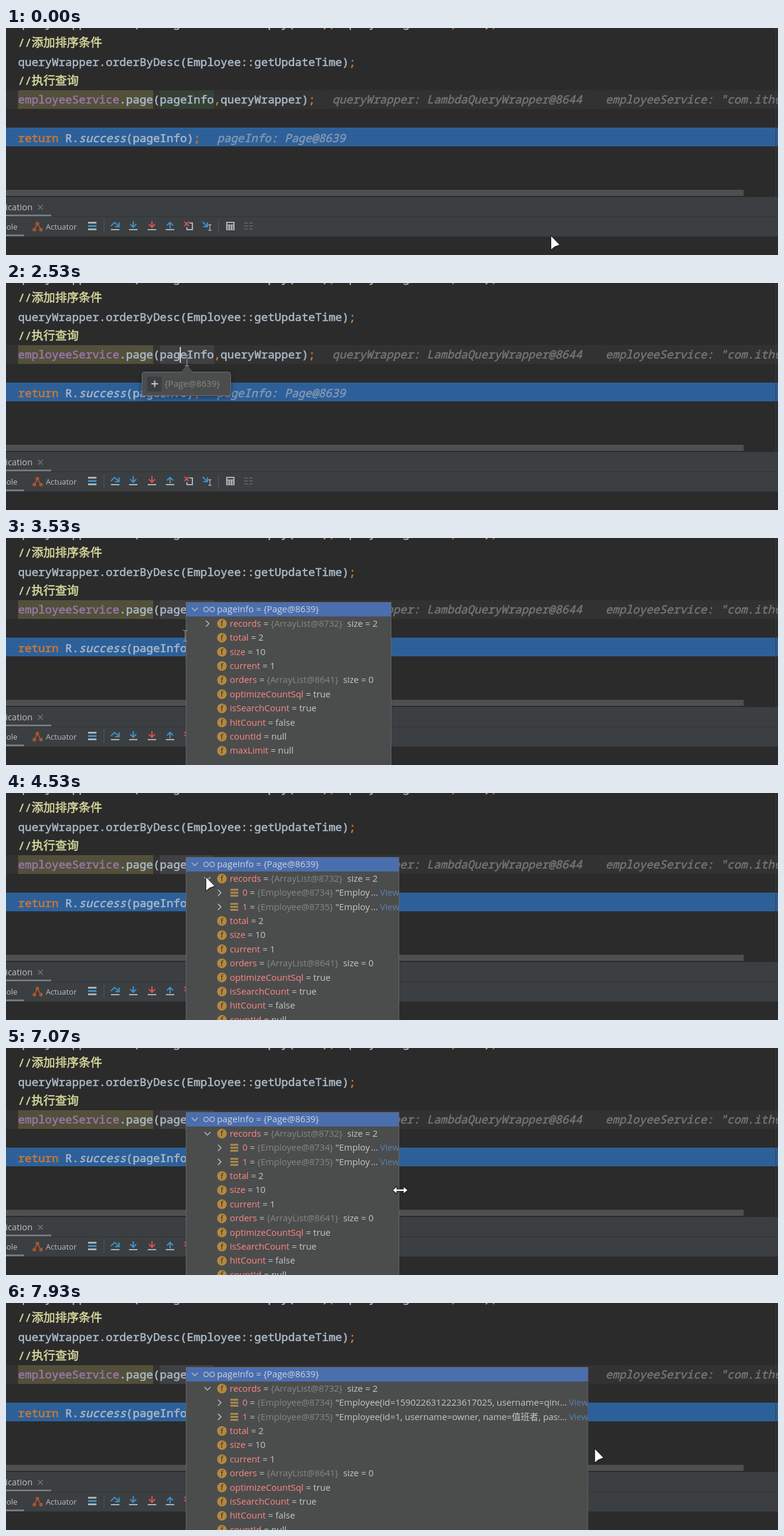
Recreate the animation shown at these times as an HTML page with a canvas. Size 1280 by 376 pixels, loop 8000 ms.

```html
<!DOCTYPE html>
<html lang="en">
<head>
<meta charset="utf-8">
<title>Debugger popup</title>
<style>
html, body { margin: 0; width: 100%; height: 100%; overflow: hidden; background: #2b2b2b; }
canvas { display: block; }
</style>
</head>
<body>
<canvas id="stage" width="1280" height="376"></canvas>
<script>
const g = document.getElementById('stage').getContext('2d');

const MONO = '18.667px "Noto Sans Mono", "Noto Sans CJK SC", monospace';
const CODE = '500 ' + MONO;
const SLANT = 'italic 500 ' + MONO;
const CJK = '500 19.5px "Noto Sans CJK SC", "Noto Sans CJK", sans-serif';
const ui = px => px + 'px "Open Sans", "Noto Sans", "Noto Sans CJK SC", sans-serif';

const PLAIN = '#a9b7c6', ORANGE = '#cc7832', HINT = '#707478', COMMENT = '#d3d79b';
const PINK = '#ff8785', VALUE = '#c6c6c6', DIM = '#868686';
const BLUE = '#3d93cb', RED = '#d9534f', GREY = '#afb1b3';
const PANEL = '#3c3f41', POPUP = '#4b4d4d', BORDER = '#626566';

// --- helpers -------------------------------------------------------------

function rect(x, y, w, h, color) {
  g.fillStyle = color;
  g.fillRect(x, y, w, h);
}

function stroke(color, width, ...lines) {
  g.strokeStyle = color;
  g.lineWidth = width;
  g.beginPath();
  for (const p of lines) {
    g.moveTo(p[0], p[1]);
    for (let i = 2; i < p.length; i += 2) g.lineTo(p[i], p[i + 1]);
  }
  g.stroke();
}

function poly(color, ...p) {
  g.fillStyle = color;
  g.beginPath();
  for (let i = 0; i < p.length; i += 2) g.lineTo(p[i], p[i + 1]);
  g.closePath();
  g.fill();
}

function disc(x, y, r, color) {
  g.fillStyle = color;
  g.beginPath();
  g.arc(x, y, r, 0, 7);
  g.fill();
}

// Draws [text, color, font?] runs one after another; heft thickens the glyphs.
function runs(x, y, font, list, heft = 0) {
  for (const [text, color, own] of list) {
    g.font = own || font;
    g.fillStyle = g.strokeStyle = color;
    g.fillText(text, x, y);
    if (heft) {
      g.lineWidth = heft;
      g.strokeText(text, x, y);
    }
    x += g.measureText(text).width;
  }
}

const code = (x, y, ...list) => runs(x, y, CODE, list, 0.6);

function label(text, x, y, color, size, align = 'left') {
  g.textAlign = align;
  runs(x, y, ui(size), [[text, color]]);
  g.textAlign = 'left';
}

function clipped(x, y, w, h, paint) {
  g.save();
  g.beginPath();
  g.rect(x, y, w, h);
  g.clip();
  paint();
  g.restore();
}

// --- timeline, in ticks of 1/15 s ----------------------------------------

const TICKS = 120;
const CARET_ON = 23, CARET_OFF = 45, HINT_ON = 38, TREE_ON = 52, EXPAND = 68, DRAG = 110;

// Pointer moves: start tick, end tick, x, y
const HOME = [904, 345];
const MOVES = [
  [0, 11, 293, 129],
  [24, 27, 300, 128],
  [42, 48, 298, 173],
  [50, 53, 297, 162],
  [58, 67, 332, 140],
  [73, 80, 592, 187],
  [80, 86, 649, 230],
  [DRAG, 125, 1054, 245]
];

const easeOut = k => Math.sin(k * Math.PI / 2);

function pointerAt(tick) {
  let [x, y] = HOME;
  for (const [from, to, toX, toY] of MOVES) {
    if (tick <= from) break;
    const k = easeOut(Math.min(1, (tick - from) / (to - from)));
    x += (toX - x) * k;
    y += (toY - y) * k;
  }
  return [x, y];
}

// The dragged edge trails the pointer by about half a tick.
function treeEdge(tick) {
  if (tick < EXPAND) return 639;
  return tick <= DRAG ? 652 : pointerAt(tick - 0.55)[0] + 3;
}

// Hovering near the edge flickers to the resize shape before it is grabbed.
function pointerShape(tick, x, y) {
  const grip = tick === 87 || tick === 95 || tick >= 104 && tick <= DRAG;
  if (grip) return 'resize';
  const overTree = tick >= TREE_ON && x > 298;
  return overTree || y > 268 ? 'arrow' : 'beam';
}

// --- editor --------------------------------------------------------------

function editor(tick) {
  rect(0, 0, 1280, 376, '#2b2b2b');
  rect(0, 103, 1280, 31, '#323232');
  rect(0, 165, 1280, 31, '#2d6099');
  rect(20, 103, 224, 31, '#52503a');
  rect(255, 103, 90, 31, tick < HINT_ON ? '#344134' : '#404042');

  code(20, -1,
    ['queryWrapper.like(StringUtils.isNotEmpty(name)', PLAIN], [',', ORANGE],
    ['Employee::getName', PLAIN], [',', ORANGE], ['name)', PLAIN], [';', ORANGE]);
  code(20, 31, ['//', COMMENT], ['添加排序条件', COMMENT, CJK]);
  code(20, 62.5, ['queryWrapper.orderByDesc(Employee::getUpdateTime)', PLAIN], [';', ORANGE]);
  code(20, 93.5, ['//', COMMENT], ['执行查询', COMMENT, CJK]);
  code(20, 125,
    ['employeeService', '#9876aa'], ['.page(pageInfo', PLAIN], [',', ORANGE],
    ['queryWrapper)', PLAIN], [';', ORANGE]);
  code(541, 125, ['queryWrapper: LambdaQueryWrapper@8644', HINT, SLANT]);
  code(994, 125, ['employeeService: "com.ithe', HINT, SLANT]);
  code(20, 188.5,
    ['return ', ORANGE], ['R.', PLAIN], ['success', PLAIN, SLANT],
    ['(pageInfo)', PLAIN], [';', ORANGE]);
  code(350, 188.5, ['pageInfo: Page@8639', '#8296b2', SLANT]);

  rect(1276, 0, 1, 280, '#3b3d3e');
  rect(0, 268, 1223, 10, '#4e4f4f');
  if (tick >= CARET_ON && tick < CARET_OFF) rect(288, 106, 2, 26, '#d0d0d0');
}

// --- tool window ---------------------------------------------------------

function tab(text, right, y, size, lineWidth, lineY) {
  label(text, right, y, '#bfc1c3', size, 'right');
  rect(0, lineY, lineWidth, 3, '#747a80');
}

function cross(x, y, r, color, width) {
  stroke(color, width, [x - r, y - r, x + r, y + r], [x + r, y - r, x - r, y + r]);
}

function stepIcon(x, color, d = 1) {
  const y = 326;
  stroke(color, 2, [x, y - 6 * d, x, y + 3 * d], [x - 5, y - d, x, y + 4 * d, x + 5, y - d]);
  rect(x - 7, 333, 14, 2, GREY);
}

function actuatorIcon(x, y) {
  const rust = '#a8552f';
  stroke(rust, 1.8, [x - 6, y + 5, x - 1, y - 5, x + 5, y + 5]);
  for (const dx of [-6, 5]) disc(x + dx, y + 5, 3, rust);
  disc(x - 1, y - 5, 3, rust);
}

function calculatorIcon(x, y) {
  rect(x, y, 14, 14, GREY);
  rect(x + 2, y + 2, 10, 2.5, PANEL);
  for (let i = 0; i < 9; i++)
    rect(x + 2 + i % 3 * 4, y + 6.5 + Math.floor(i / 3) * 2.4, 2, 1.3, PANEL);
}

function toolWindow() {
  rect(0, 280, 1280, 65, PANEL);
  rect(0, 312, 1280, 1, '#323435');
  rect(0, 345, 1280, 1, '#323232');
  tab('Application', 44, 302, 14.4, 75, 309);
  cross(57, 297, 4, '#75797b', 1.2);
  tab('Console', 19, 334, 12.8, 30, 342);
  actuatorIcon(53, 329);
  label('Actuator', 66, 334, '#bbbdbf', 12.8);

  for (let i = 0; i < 3; i++) rect(136, 321 + i * 5.5, 14, 3, i === 1 ? BLUE : GREY);
  for (const x of [162, 352]) rect(x, 317, 1, 23, '#55585a');

  stroke(BLUE, 2, [174, 328, 180, 322, 187, 328], [187.5, 322, 187.5, 329, 181, 329]);
  rect(174, 333, 14, 2, GREY);
  stepIcon(211, BLUE);
  stepIcon(242, RED);
  stepIcon(272, BLUE, -1);

  cross(299.5, 324.5, 3.5, RED, 2);
  stroke(GREY, 2, [304, 323, 309, 323, 309, 334, 300, 334, 300, 330]);
  stroke(BLUE, 2, [326, 321, 333, 328], [334, 322, 334, 329, 327, 329]);
  stroke(GREY, 1.3, [338, 326, 338, 335], [335.5, 326, 340.5, 326], [335.5, 335, 340.5, 335]);
  calculatorIcon(365, 321);
  for (let y = 322; y < 335; y += 5) {
    rect(395, y, 6, 2, '#5b5e60');
    rect(403, y, 6, 2, '#5b5e60');
  }
}

// --- popups --------------------------------------------------------------

function hintPopup() {
  g.save();
  g.shadowColor = 'rgba(0,0,0,.45)';
  g.shadowBlur = 9;
  g.shadowOffsetY = 3;
  g.fillStyle = POPUP;
  g.beginPath();
  g.roundRect(225.5, 147.5, 147, 39, 4);
  g.fill();
  g.restore();
  g.strokeStyle = '#6c6f70';
  g.lineWidth = 1;
  g.stroke();
  poly(POPUP, 291, 149, 300, 137, 309, 149);
  stroke('#6c6f70', 1, [291, 147.5, 300, 137, 309, 147.5]);
  rect(234, 155, 24, 25, PANEL);
  stroke('#c8c8c8', 2, [241, 167, 252, 167], [246.5, 161.5, 246.5, 172.5]);
  label('{Page@8639}', 263, 172, DIM, 14.8);
}

function chevron(x, y, open) {
  stroke('#b8babc', 1.5, open
    ? [x - 5, y - 2.5, x, y + 2.5, x + 5, y - 2.5]
    : [x - 2.5, y - 5, x + 2.5, y, x - 2.5, y + 5]);
}

const FIELDS = [
  ['records', '{ArrayList@8732}', '  size = 2'], ['total', '', '2'], ['size', '', '10'],
  ['current', '', '1'], ['orders', '{ArrayList@8641}', '  size = 0'],
  ['optimizeCountSql', '', 'true'], ['isSearchCount', '', 'true'], ['hitCount', '', 'false'],
  ['countId', '', 'null'], ['maxLimit', '', 'null']
];

const ITEMS = [
  ['0', '{Employee@8734}', ' "Employee(id=1590226312223617025, username=qinolu, name='],
  ['1', '{Employee@8735}', ' "Employee(id=1, username=owner, name=值班者, password=']
];

function entry(x, y, [name, ref, value]) {
  runs(x, y + 5, ui(14.8), [[name, PINK], [' = ', VALUE], [ref, DIM], [value, VALUE]]);
}

function itemRow(y, item, right) {
  chevron(354, y);
  for (let i = -1; i < 2; i++) rect(372, y - 1.5 + i * 5, 13, 3, '#ad8a4c');
  clipped(299, y - 12, right - 347, 24, () => entry(392, y, item));
  label('...', right - 47, y + 5, VALUE, 14.8);
  label('View', right - 32, y + 5, '#5b7fae', 14.8);
}

function treeHeader(right) {
  rect(298, 106, right - 298, 24, '#4b6eaf');
  chevron(313, 118, true);
  g.strokeStyle = '#b4bac2';
  g.lineWidth = 1.5;
  g.beginPath();
  for (const x of [328, 338]) g.roundRect(x, 114.5, 7.5, 7.5, 3.5);
  g.stroke();
  label('pageInfo = {Page@8639}', 350, 123, '#cfd4dc', 14.8);
}

function treePopup(tick) {
  const open = tick >= EXPAND;
  const right = treeEdge(tick);
  clipped(298, 106, right - 298, 270, () => {
    rect(298, 106, right - 298, 270, POPUP);
    treeHeader(right);

    let y = 118.4;
    for (const field of FIELDS) {
      y += 23.4;
      disc(358, y, 8, '#b4883f');
      label('f', 358, y + 4.5, '#33302a', 13, 'center');
      entry(371, y, field);
      if (field !== FIELDS[0]) continue;
      chevron(334, y, open);
      if (open) for (const item of ITEMS) itemRow(y += 23.4, item, right);
    }
    g.strokeStyle = BORDER;
    g.lineWidth = 1;
    g.strokeRect(298.5, 106.5, right - 299, 300);
  });
}

// --- pointer -------------------------------------------------------------

const SHAPES = {
  arrow() {
    poly('#1c1c1c', -1, -2, -1, 23.5, 6, 18.5, 15, 15);
    poly('#ffffff', 0, 0, 0, 21.5, 5.5, 17, 13.5, 14);
  },
  beam() {
    stroke('#a2a5a8', 1, [0, -8, 0, 8]);
    for (const d of [-1, 1])
      stroke('#a2a5a8', 1, [-3.5, 9 * d, -1, 9 * d, 0, 8 * d, 1, 9 * d, 3.5, 9 * d]);
  },
  resize() {
    g.translate(4.5, 5.5);
    const body = [-12, 0, -6, -5, -6, -1.3, 6, -1.3, 6, -5, 12, 0, 6, 5, 6, 1.3, -6, 1.3, -6, 5];
    stroke('#1c1c1c', 2.4, [...body, -12, 0]);
    poly('#ffffff', ...body);
  }
};

function pointer(tick) {
  const [x, y] = pointerAt(tick);
  g.save();
  g.translate(x, y);
  SHAPES[pointerShape(tick, x, y)]();
  g.restore();
}

// --- loop ----------------------------------------------------------------

function draw(ms) {
  const tick = Math.floor((ms + 4) * 15 / 1000) % TICKS;
  editor(tick);
  toolWindow();
  if (tick >= TREE_ON) treePopup(tick);
  else if (tick >= HINT_ON) hintPopup();
  pointer(tick);
}

const start = performance.now();
(function frame() {
  draw((performance.now() - start) % 8000);
  requestAnimationFrame(frame);
})();
</script>
</body>
</html>
```
